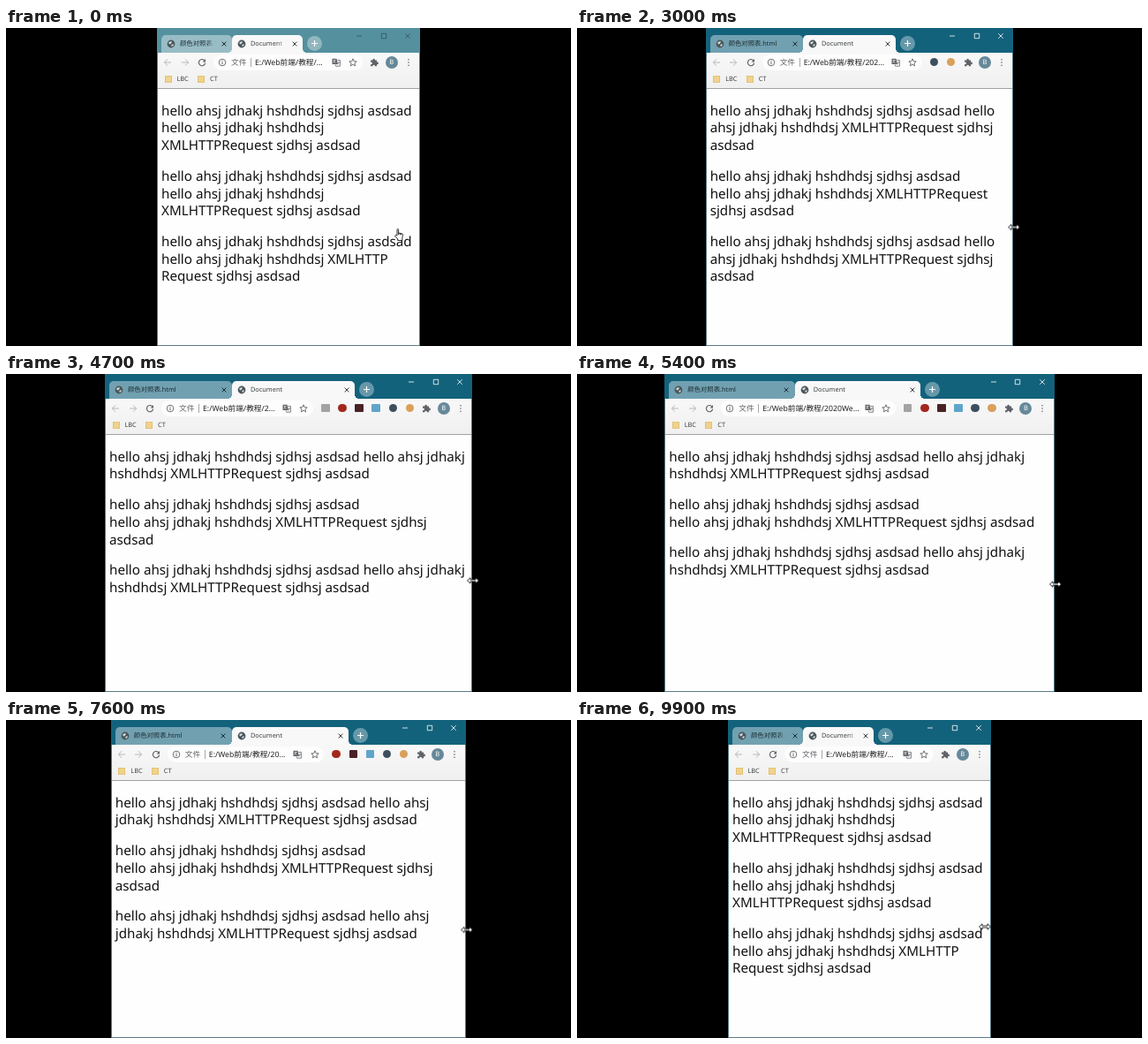
Write an HTML page that moves like this. It is 640 by 360 pixels and loops after 10000 ms.

```html
<!DOCTYPE html>
<html>
<head>
<meta charset="utf-8">
<title>Resizing a window</title>
<style>
  html, body { margin: 0; width: 100%; height: 100%; overflow: hidden; background: #000; }
  body {
    position: relative;
    font: 7.35px/12px "Noto Sans", "Noto Sans CJK SC", sans-serif;
    text-rendering: geometricPrecision;
    color: #3c4043;
  }
  .stage { position: absolute; left: 0; top: 0; width: 640px; height: 360px; overflow: hidden; }
  .win {
    position: absolute; inset: 0; margin: 0 auto; width: 298px;
    container-type: inline-size;
    animation: resize 10s infinite;
  }
  .frame { position: absolute; inset: 0; overflow: hidden; background: #fefefe; }
  .frame::after {
    content: ""; position: absolute; inset: 28px 0 0;
    border: solid #5b7c89; border-width: 0 1px 1px;
  }

  svg { overflow: visible; fill: none; stroke: currentColor; }
  .i { position: absolute; width: 12px; height: 12px; margin: -6px 0 0 -6px; }

  /* title bar */
  .title {
    position: absolute; inset: 0 0 auto; height: 28px;
    animation: focus 10s step-end infinite;
  }
  .tabs { position: absolute; left: 5px; right: 0; top: 8px; height: 20px; display: flex; }
  .tab {
    position: relative; flex: none; height: 20px;
    width: min(142.5px, (100cqw - 138px) / 2);
    border-radius: 5px 5px 0 0;
    background: rgba(255, 255, 255, .4);
    color: #1c2a30;
  }
  .tab.on { background: #f8f8f8; color: #3c4043; }
  .tab.on::before, .tab.on::after {
    content: ""; position: absolute; bottom: 0; width: 5px; height: 5px;
  }
  .tab.on::before { right: 100%; background: radial-gradient(circle at 0 0, transparent 5px, #f8f8f8 5px); }
  .tab.on::after { left: 100%; background: radial-gradient(circle at 100% 0, transparent 5px, #f8f8f8 5px); }
  .tab span {
    position: absolute; left: 21px; right: 19px; top: 4px;
    overflow: hidden; white-space: nowrap;
    -webkit-mask: linear-gradient(to left, transparent, #000 10px);
    mask: linear-gradient(to left, transparent, #000 10px);
  }
  .tab .i { top: 9.5px; }
  .add {
    flex: none; width: 17px; height: 17px; margin: 1px 0 0 5px;
    border-radius: 50%; background: rgba(255, 255, 255, .35); color: #fff;
  }

  /* toolbar */
  .bar {
    position: absolute; inset: 28px 0 auto; height: 40px;
    background: linear-gradient(#f8f8f8, #f0f0f0); border-bottom: 1px solid #a0a2a3;
    color: #5f6368;
  }
  .bar > .i { top: 10.5px; }
  .row { display: flex; height: 21px; padding: 0 3.8px 0 64px; align-items: center; }
  .omni {
    position: relative; flex: 1; height: 18px; margin-right: 4.4px;
    border-radius: 9px; background: #fdfdfd; font-size: 8.7px; line-height: 18px;
  }
  .omni .i { top: 9px; }
  .kind { position: absolute; left: 20px; }
  .rule { position: absolute; left: 42px; top: 4px; width: 1px; height: 10px; background: #a5a8ab; }
  .url {
    position: absolute; left: 47px; right: 41px; color: #202124;
    overflow: hidden; white-space: nowrap; text-overflow: ellipsis;
  }
  .slot { flex: none; width: 19.1px; height: 21px; display: flex; align-items: center; justify-content: center; }
  .slot svg { width: 12px; height: 12px; }
  .ext { display: none; }
  .ext::before { content: ""; width: 9.5px; height: 9.5px; background: var(--c); border-radius: var(--r, 1px); }
  .dot { --r: 50%; }
  .face {
    width: 14px; height: 14px; border-radius: 50%; background: #66899a;
    color: #fff; font-size: 7.5px; line-height: 14px; text-align: center;
  }
  .mark { position: absolute; top: 24px; color: #3c4043; }
  .mark::before {
    content: ""; position: absolute; left: -14px; top: 2px; width: 8px; height: 8px;
    border-radius: 1px; background: #f0d28c; box-shadow: inset 0 0 0 .6px #d9b566;
  }

  /* one more extension for each 19.3px of spare room */
  @container (min-width: 318px) { .e1 { display: flex; } }
  @container (min-width: 338px) { .e2 { display: flex; } }
  @container (min-width: 357px) { .e3 { display: flex; } }
  @container (min-width: 376px) { .e4 { display: flex; } }
  @container (min-width: 396px) { .e5 { display: flex; } }
  @container (min-width: 415px) { .e6 { display: flex; } }

  .page { position: absolute; inset: 70px 5px 0; color: #111; font-size: 15.2px; line-height: 19.8px; }
  .page p { margin: 14.7px 0; }

  .cursor { position: absolute; left: 100%; top: 0; animation: move 10s infinite; }
  .cursor svg { position: absolute; fill: #fff; stroke: #000; }
  .hand { left: -5px; top: -7px; width: 10px; height: 14px; animation: hide 10s step-end infinite; }
  .arrow { left: -7px; top: -4px; width: 14px; height: 8px; animation: show 10s step-end infinite; }

  @keyframes resize {
    0% { width: 298px; animation-timing-function: step-end; }
    16% { width: 298px; animation-timing-function: steps(5); }
    21% { width: 304px; animation-timing-function: steps(6); }
    27% { width: 334px; animation-timing-function: steps(11); }
    38% { width: 388px; animation-timing-function: steps(1); }
    39% { width: 392px; animation-timing-function: steps(10); }
    49% { width: 422px; animation-timing-function: steps(5); }
    54% { width: 441.5px; animation-timing-function: steps(6); }
    60% { width: 466px; animation-timing-function: steps(6); }
    66% { width: 446px; animation-timing-function: steps(5); }
    71% { width: 426px; animation-timing-function: steps(11); }
    82% { width: 374px; animation-timing-function: steps(3); }
    85% { width: 362px; animation-timing-function: steps(8); }
    93% { width: 330px; animation-timing-function: steps(6); }
    99%, 100% { width: 298px; }
  }
  @keyframes move {
    0%, 9% { transform: translate(-24px, 234px); animation-timing-function: steps(6); }
    15% { transform: translate(0, 222px); animation-timing-function: steps(6); }
    21% { transform: translate(1px, 222px); animation-timing-function: steps(18); }
    39% { transform: translate(1px, 229px); animation-timing-function: steps(15); }
    54% { transform: translate(1px, 238px); animation-timing-function: steps(12); }
    66% { transform: translate(1px, 238px); animation-timing-function: steps(19); }
    85% { transform: translate(1px, 237px); animation-timing-function: steps(8); }
    93% { transform: translate(1px, 235px); animation-timing-function: steps(6); }
    99%, 100% { transform: translate(-7px, 234px); }
  }
  @keyframes focus {
    0% { background: #55909f; color: #31525d; }
    6%, 100% { background: #13627c; color: #fff; }
  }
  @keyframes hide { 0% { opacity: 1; } 13%, 100% { opacity: 0; } }
  @keyframes show { 0% { opacity: 0; } 13%, 100% { opacity: 1; } }
</style>
</head>
<body>
<svg width="0" height="0" style="position:absolute">
  <symbol id="globe" viewBox="-6 -6 12 12">
    <circle r="4.4" fill="#4b565b" stroke="none"/>
    <path d="M-3-1.2Q-1-3 1-2.6L0-.6-1.6.4ZM.4.8 3 .2Q2.6 2.6.6 3Z" fill="#d5dcde" stroke="none"/>
  </symbol>
  <symbol id="cross" viewBox="-6 -6 12 12"><path d="M-2.4-2.4 2.4 2.4M2.4-2.4-2.4 2.4"/></symbol>
</svg>

<div class="stage">
  <div class="win">
    <div class="frame">
      <div class="title">
        <div class="tabs">
          <div class="tab">
            <svg class="i" style="left:11px"><use href="#globe"/></svg>
            <span>颜色对照表.html</span>
            <svg class="i" style="left:calc(100% - 9.5px)"><use href="#cross"/></svg>
          </div>
          <div class="tab on">
            <svg class="i" style="left:11px"><use href="#globe"/></svg>
            <span>Document</span>
            <svg class="i" style="left:calc(100% - 9.5px)"><use href="#cross"/></svg>
          </div>
          <svg class="add" viewBox="-8.5 -8.5 17 17"><path d="M-3.5 0H3.5M0-3.5V3.5" stroke-width="1.2"/></svg>
        </div>
        <svg class="i" style="left:calc(100% - 69px);top:8.5px" viewBox="-6 -6 12 12"><path d="M-3 0H3" stroke-width=".8"/></svg>
        <svg class="i" style="left:calc(100% - 41.5px);top:8.5px" viewBox="-6 -6 12 12"><path d="M-2.7-2.7H2.7V2.7H-2.7Z" stroke-width=".8"/></svg>
        <svg class="i" style="left:calc(100% - 14px);top:8.5px" viewBox="-6 -6 12 12"><path d="M-2.8-2.8 2.8 2.8M2.8-2.8-2.8 2.8" stroke-width=".8"/></svg>
      </div>

      <div class="bar">
        <svg class="i" style="left:12px;color:#b4b7ba" viewBox="-6 -6 12 12"><path d="M4 0H-3.6M0-3.7-3.7 0 0 3.7"/></svg>
        <svg class="i" style="left:31.5px;color:#b4b7ba" viewBox="-6 -6 12 12"><path d="M-4 0H3.6M0-3.7 3.7 0 0 3.7"/></svg>
        <svg class="i" style="left:51px" viewBox="-6 -6 12 12"><path d="M2.7-2.3A3.6 3.6 0 1 0 3.6.6" stroke-width="1.2"/><path d="M4-4V-.6H.6Z" fill="currentColor" stroke="none"/></svg>
        <div class="row">
          <div class="omni">
            <svg class="i" style="left:10px" viewBox="-6 -6 12 12"><circle r="3.8" stroke-width=".9"/><path d="M0-.5V2.2M0-2.2V-1.2"/></svg>
            <span class="kind">文件</span>
            <i class="rule"></i>
            <span class="url">E:/Web前端/教程/2020Web前端/颜色对照表.html</span>
            <svg class="i" style="left:calc(100% - 30px)" viewBox="-6 -6 12 12">
              <path d="M-4.5-4.2H.5L2 2H-4.5Z" fill="#5f6368" stroke="none"/>
              <path d="M1.4-2.6H4.4V4.2H-.4L-.8 2.4" stroke-width=".8"/>
              <path d="M-3.4-2.3H-.3M-1.9-3.2V-2.3Q-2-.4-3.4.5M-2.7-1-.6.6" stroke="#fff" stroke-width=".6"/>
              <path d="M2.2 0H3.8M3-.8Q3 1.8 1.8 2.5" stroke-width=".6"/>
            </svg>
            <svg class="i" style="left:calc(100% - 10.5px)" viewBox="-6 -6 12 12"><path d="M0-4.2 1.2-1.3 4.2-1.1 1.9.9 2.6 3.9 0 2.3-2.6 3.9-1.9.9-4.2-1.1-1.2-1.3Z" stroke-width=".9"/></svg>
          </div>
          <div class="slot ext e6" style="--c:#a3a3a3"></div>
          <div class="slot ext dot e5" style="--c:#a3281c"></div>
          <div class="slot ext e4" style="--c:#4a2226"></div>
          <div class="slot ext e3" style="--c:#5fa5cb"></div>
          <div class="slot ext dot e2" style="--c:#3d4f5e"></div>
          <div class="slot ext dot e1" style="--c:#d9a05a"></div>
          <div class="slot"><svg viewBox="-6 -6 12 12"><path d="M-4-2.6H-1.6A1.3 1.3 0 1 1 .9-2.6H3.1V-.3A1.3 1.3 0 1 1 3.1 2.1V4.3H.9A1.3 1.3 0 1 0-1.6 4.3H-4V2.1A1.3 1.3 0 1 0-4-.3Z" fill="currentColor" stroke="none"/></svg></div>
          <div class="slot"><div class="face">B</div></div>
          <div class="slot"><svg viewBox="-6 -6 12 12"><path d="M0-3.2V3.3" stroke-width="1.6" stroke-linecap="round" stroke-dasharray="0 3.2"/></svg></div>
        </div>
        <span class="mark" style="left:22.5px">LBC</span>
        <span class="mark" style="left:60px">CT</span>
      </div>

      <div class="page">
        <p>hello ahsj jdhakj hshdhdsj sjdhsj asdsad hello ahsj jdhakj hshdhdsj XMLHTTPRequest sjdhsj asdsad</p>
        <p>hello ahsj jdhakj hshdhdsj sjdhsj asdsad<br>hello ahsj jdhakj hshdhdsj XMLHTTPRequest sjdhsj asdsad</p>
        <p>hello ahsj jdhakj hshdhdsj sjdhsj asdsad hello ahsj jdhakj hshdhdsj XMLHTTP<wbr>Request sjdhsj asdsad</p>
      </div>
    </div>

    <div class="cursor">
      <svg class="hand" viewBox="0 0 10 14"><path d="M3 8V1.4Q3 .5 3.8.5T4.6 1.4V5L9 6Q9.6 6.3 9.5 7.2L8.8 11V13.5H3.8V12L.7 8.6Q.5 7.6 1.4 7.4ZM4.6 5V7M6.2 5.4V7.2M7.7 5.8V7.4" stroke-width=".8"/></svg>
      <svg class="arrow" viewBox="0 0 14 8"><path d="M.5 4 4 .8V3H10V.8L13.5 4 10 7.2V5H4V7.2Z" stroke-width=".8"/></svg>
    </div>
  </div>
</div>
</body>
</html>
```
